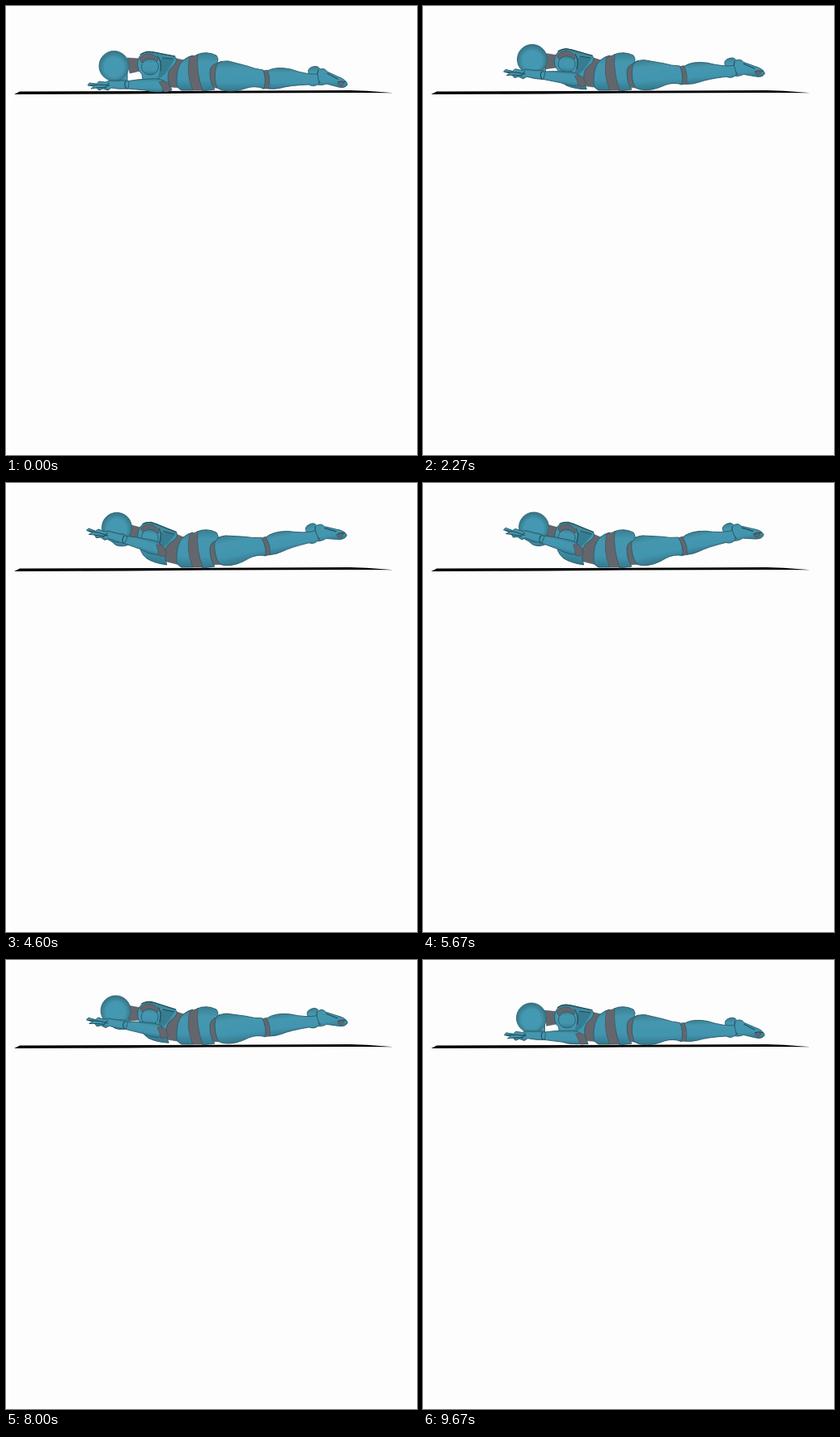
Animation of 508x554 px, one loop 9.74 s. Source, as an HTML page:

```html
<!DOCTYPE html>
<html lang="en">
<head>
<meta charset="utf-8">
<title>Prone lift</title>
<style>
  html, body { margin: 0; width: 100%; height: 100%; overflow: hidden; background: #fff; }
  svg { display: block; width: 508px; height: 554px; }
  .skin { fill: url(#skin); stroke: #2a5c69; stroke-width: .9; stroke-linejoin: round; }
  .joint { fill: #64666d; stroke: #42505a; stroke-width: .6; }
  .crease { fill: none; stroke: #224a55; stroke-width: 1.1; stroke-linecap: round; }
  .shade { fill: #2d6c7f; opacity: .6; }
</style>
</head>
<body>
<svg viewBox="0 0 508 554">
  <defs>
    <linearGradient id="skin" x1="0" y1="0" x2="0" y2="1">
      <stop offset="0" stop-color="#3a7f90"/>
      <stop offset=".25" stop-color="#4597af"/>
      <stop offset=".7" stop-color="#4295af"/>
      <stop offset="1" stop-color="#35788c"/>
    </linearGradient>
    <radialGradient id="ball" cx=".5" cy=".54" r=".53">
      <stop offset=".6" stop-color="#4598b1"/>
      <stop offset="1" stop-color="#357383"/>
    </radialGradient>
  </defs>
  <rect x="6" width="502" height="554" fill="#fdfdfe"/>
  <path d="M10 109L17 105.6L180 105L425 104L446 104.8L479 107.2L440 107L250 107.6L150 108.6Z" fill="#020204"/>

  <g id="torso">
    <path class="joint" d="M150 64L164 65L166 80L153 83Z"/>
    <path class="joint" d="M196 80L211 65L225 68L221 101L203 100Z"/>
    <path class="skin" d="M163 67Q166 57 176 56L183 57L197 60L208 62Q213 65 209 71L202 79Q197 90 205 104Q190 105 179 101Q168 95 168 84Q161 78 163 67Z"/>
    <path class="shade" d="M190 66Q200 64 208 66L201 78Q196 86 186 92Q192 80 190 66Z"/>
    <path class="joint" d="M165 66Q168 59 178 59Q186 61 188 67L183 70Q176 65 168 70Z"/>
    <ellipse class="skin" cx="178" cy="75" rx="10.5" ry="10"/>
    <path class="crease" d="M166 60Q172 55 183 57L209 62M187 62Q193 68 191 80M193 64L207 65"/>
  </g>

  <g id="leg">
    <path class="joint" d="M249 74L267 68L266 102L253 100Z"/>
    <path class="skin" d="M374 83Q372 77 379 75Q386 73 388 78Q394 76 397 81L410 87Q421 91 422 97Q419 102 411 100L396 96Q388 99 383 96Z"/>
    <path class="crease" d="M386 79Q383 88 388 95M397 83L410 90M410 94Q414 92 420 94"/>
    <path class="joint" d="M410 96L414 93L418 95L414 99Z"/>
    <path class="skin" d="M323 80Q334 74 352 78Q372 85 385 84L387 95Q382 101 374 97Q350 98 340 101Q332 103 324 102Q328 90 323 80Z"/>
    <path class="joint" d="M317 80L323 79Q327 90 324 102L317 102Q322 90 317 80Z"/>
    <path class="skin" d="M260 74Q263 67 275 68L298 74Q308 78 318 79Q322 90 319 102Q308 98 298 101Q290 104 282 105Q268 106 261 101Q256 90 260 74Z"/>
  </g>

  <path class="skin" d="M211 97Q210 75 219 67Q225 62 231 61Q224 84 231 104L217 104Q212 102 211 97Z"/>
  <path class="skin" d="M236 60Q248 55 260 61Q264 66 260 71Q252 73 252 82Q252 95 258 103L243 105Q235 84 236 60Z"/>
  <path class="joint" d="M227 63L237 60Q235 82 243 104L231 104Q222 84 227 63Z"/>

  <g id="head">
    <path class="skin" d="M124 85L150 81L150 94Q142 99 133 96Q126 92 124 85Z"/>
    <circle cx="133.5" cy="74" r="18.5" fill="url(#ball)" stroke="#2f6675" stroke-width=".8"/>
  </g>

  <g id="arm">
    <path class="skin" d="M148 93Q164 90 178 90Q190 88 197 94Q202 101 192 106Q182 107 172 104L150 102Z"/>
    <path class="joint" d="M189 94Q195 91 200 95L204 102Q202 107 195 106Q193 99 189 94Z"/>
    <path class="skin" d="M101 98L103 95L112 96L115 93L123 94L128 92L140 92Q149 90 152 94L151 102Q140 103 130 101L126 104L120 102L115 104L112 101L105 102L109 99Z"/>
    <path class="crease" d="M104 98L117 97L128 98M112 101L123 100M127 95L123 101M148 93Q145 97 149 102"/>
  </g>
</svg>
<script>
const LOOP = 9740, FPS = 15;
// [time in ms, amount of lift]
const lift = [[0, 0], [2270, .42], [3330, .73], [4600, .99], [5400, 1.01], [6670, .95], [8000, .6], [LOOP, .11]];
const [head, torso, leg, arm] = ['head', 'torso', 'leg', 'arm'].map(id => document.getElementById(id));

function slope(i) {
  const a = lift[Math.max(i - 1, 0)], b = lift[Math.min(i + 1, lift.length - 1)];
  return (b[1] - a[1]) / (b[0] - a[0]);
}

// Smooth Hermite curve through the keys
function liftAt(t) {
  let i = 0;
  while (i < lift.length - 2 && t >= lift[i + 1][0]) i++;
  const [t0, a] = lift[i], [t1, b] = lift[i + 1];
  const d = t1 - t0, u = (t - t0) / d, v = 1 - u;
  return v * v * (1 + 2 * u) * a + u * u * (3 - 2 * u) * b
    + d * u * v * (v * slope(i) - u * slope(i + 1));
}

// Shift by (dx, dy) and turn by deg about (cx, cy)
function place(el, dx, dy, deg = 0, cx = 0, cy = 0) {
  el.setAttribute('transform', `translate(${dx} ${dy}) rotate(${deg} ${cx} ${cy})`);
}

function pose(p) {
  place(head, 3.5 * p, -19.3 * p);
  place(torso, -4 * p, p, 11 * p, 225, 90);
  place(leg, 0, 0, -11.5 * p, 258, 85);
  place(arm, -5 * p, -16.5 * p, 14.5 * p, 195, 100);
}

function draw(now) {
  const step = Math.floor((now % LOOP + 4) * FPS / 1000);
  pose(liftAt(step * 1000 / FPS));
  requestAnimationFrame(draw);
}

draw(performance.now());
</script>
</body>
</html>
```
